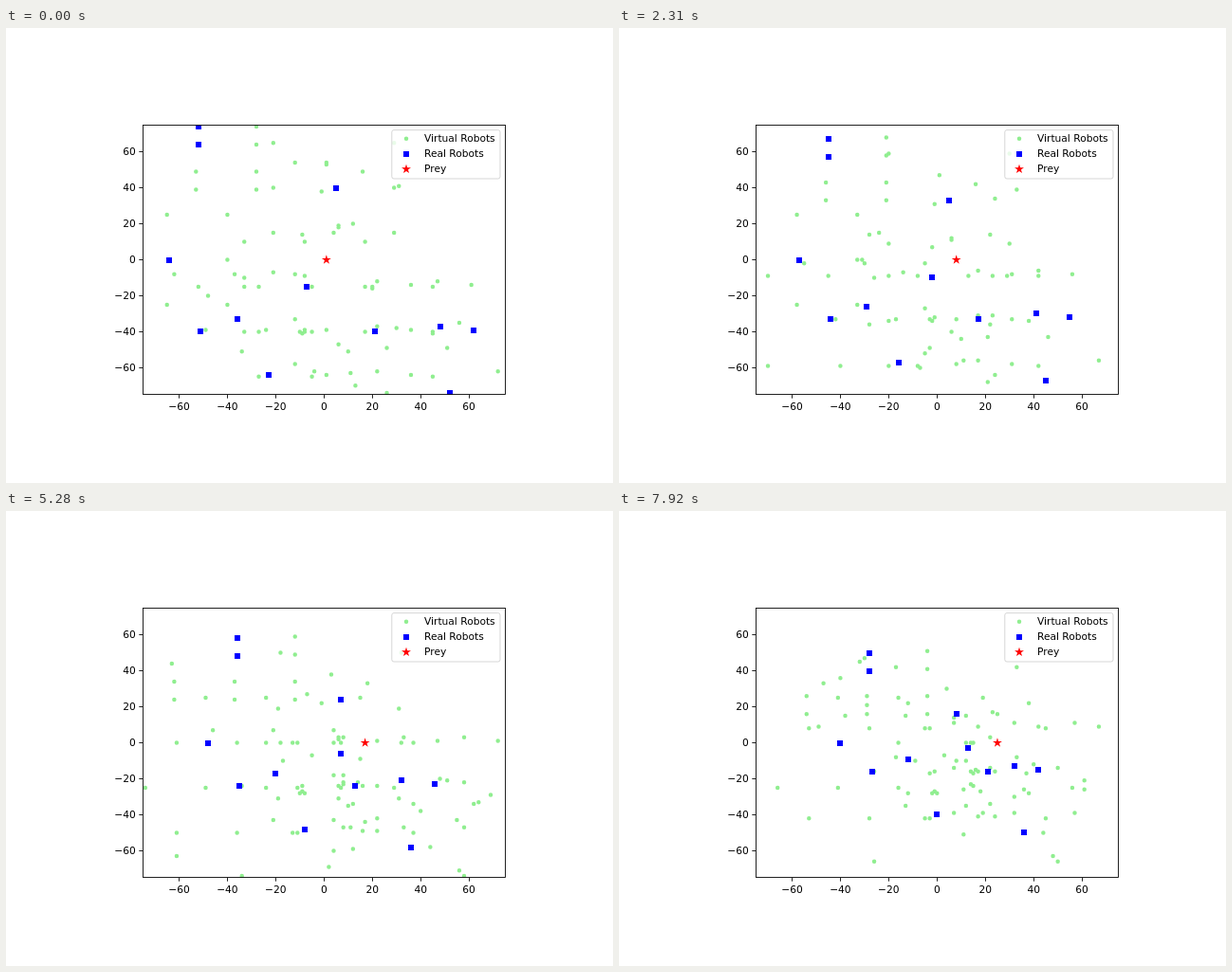
Write an HTML page that moves like this. It is 640x480 px and loops after 8 s.

```html
<!DOCTYPE html>
<html lang="en">
<head>
<meta charset="utf-8">
<title>Robots and prey</title>
<style>
html, body { margin: 0; width: 100%; height: 100%; overflow: hidden; background: #fff; }
svg { display: block; width: 100%; height: 100%; }
text { font: 10.67px "DejaVu Sans", sans-serif; }
</style>
</head>
<body>
<svg viewBox="0 0 640 480">
  <defs><clipPath id="area"><rect x="144.3" y="102.2" width="382" height="284.6"/></clipPath></defs>
  <g clip-path="url(#area)">
    <path id="virtual" fill="#90ee90"/>
    <path id="real" fill="#00f"/>
    <path id="prey" fill="#f00"/>
  </g>
  <g id="axes" fill="none" stroke="#000" stroke-width=".86">
    <rect x="144.5" y="102.5" width="382" height="284"/>
  </g>
  <g id="labels"></g>
  <g id="legend">
    <rect x="406.8" y="107.6" width="114.2" height="51.4" rx="2.2" fill="#fff" fill-opacity=".8" stroke="#ccc" stroke-opacity=".8"/>
  </g>
</svg>
<script>
const STEP = 330, LOOP = 8000, SPACING = 25, TURN = 16;
const $ = id => document.getElementById(id);
const px = x => 335.3 + 2.547 * x;
const py = y => 244.5 - 1.898 * y;

function add(parent, tag, attrs, text = '') {
  const el = document.createElementNS('http://www.w3.org/2000/svg', tag);
  for (const name in attrs) el.setAttribute(name, attrs[name]);
  el.textContent = text;
  parent.append(el);
}

// Marker outlines in stage pixels
const dot = (x, y, r = 2.25) => `M${x - r} ${y}a${r} ${r} 0 1 1 ${2 * r} 0a${r} ${r} 0 1 1 ${-2 * r} 0z`;
const square = (x, y) => `M${Math.round(x - 3)} ${Math.round(y - 3)}h6v6h-6z`;
function star(x, y, r = 5.2) {
  const tips = Array.from({ length: 10 }, (_, i) => {
    const a = i * Math.PI / 5, d = i % 2 ? r * 0.382 : r;
    return `${x + d * Math.sin(a)} ${y - d * Math.cos(a)}`;
  });
  return `M${tips.join('L')}z`;
}

const approach = (y, n) => y - Math.sign(y) * Math.min(n, Math.abs(y));

// Closes in on y = 0 one cell per step; x moves by lead until the turn, then by tail
const glide = (x, y, lead, tail = lead, turn = TURN) => k =>
  [x + lead * Math.min(k, turn) + tail * Math.max(0, k - turn), approach(y, k)];

// Passes through [step, x, y] points on the grid
const through = (...path) => k => {
  let i = 1;
  while (i < path.length - 1 && path[i][0] < k) i++;
  const [k0, x0, y0] = path[i - 1], [k1, x1, y1] = path[i];
  const u = (k - k0) / (k1 - k0);
  return [Math.round(x0 + (x1 - x0) * u), Math.round(y0 + (y1 - y0) * u)];
};

// Each robot shows virtual neighbours on some sides: always, late only, early only
const robot = (at, sides, late = '', early = '') => ({ at, sides, late, early });
const robots = [
  robot(glide(-52, 74, 1), 'E S SE', 'SW'),
  robot(glide(-52, 64, 1), 'E S SE', 'SW'),
  robot(through([0, 5, 40], [13, 5, 27], [15, 7, 25], [24, 8, 16]), 'NW NE SW SE', '', 'W E S'),
  robot(glide(-64, 0, 1), 'N NE E S SE', 'SW'),
  robot(through([0, -7, -15], [4, -5, -11], [10, 1, -10], [13, 4, -7], [21, 12, -4], [24, 13, -3]),
    'NW NE SW SE', '', 'N W E S'),
  robot(glide(-36, -33, 1), 'NW N NE E SE', 'S'),
  robot(glide(-51, -40, 1), 'NW N NE E SW SE', 'S'),
  robot(through([0, -23, -64], [24, 0, -40]), 'NW N NE E', 'SW'),
  robot(through([0, 21, -40], [4, 17, -36], [10, 17, -30], [15, 12, -25], [24, 21, -16]), 'NW NE SW SE', '', 'N W E'),
  robot(glide(48, -37, -1, 0), 'NW N W SW SE', 'NE S'),
  robot(glide(62, -39, -1, 0, 20), 'NW N W SW', 'NE'),
  robot(glide(52, -74, -1, 0), 'NW N W', 'NE')
];

function neighbours({ at, sides, late, early }, k) {
  // The neighbours trail their robot by one step
  const [x, y] = k ? at(k - 1) : [at(0)[0] - 1, at(0)[1]];
  const shown = [sides, k >= 12 ? late : '', k < 3 ? early : ''].join(' ').trim().split(/\s+/);
  return shown.map(side => [
    x + SPACING * (side.includes('E') - side.includes('W')),
    y + SPACING * (side.includes('N') - side.includes('S'))
  ]);
}

// Free virtual robots
const early = [
  glide(6, -47, 0, 1), glide(10, -51, 0, 1), glide(11, -63, 0, 1),
  glide(30, -38, -1, 1), glide(45, -41, -1, 1), glide(31, 41, -1, 1),
  glide(-1, 38, 0, 1), glide(6, 19, 0, 1), glide(6, 18, 0, 1),
  glide(-9, 14, 1), glide(20, -16, -1, 1),
  glide(-9, -41, 1), glide(-10, -40, 1), glide(-8, -39, 1),
  k => [k - 33, -10], k => [k - 21, -7],
  ...[[-4, 14], [11, 9]].map(([dx, dy]) => k => {
    const [x, y] = robots[2].at(k);
    return [x + dx, y + dy];
  })
];
const late = [
  glide(85, -45, -1), glide(80, -49, -1), glide(74, -38, -1), glide(64, -36, -1),
  glide(72, -87, -1), glide(74, -90, -1), glide(56, -54, -1),
  glide(22, -58, 0), glide(44, -74, 0), glide(8, -34, 0),
  ...[0, 1, 2].map(i => k => [k - 26 + i, -28 + i % 2])
];

function random(seed) {
  return () => {
    seed = seed + 0x6d2b79f5 | 0;
    let t = Math.imul(seed ^ seed >>> 15, 1 | seed);
    t ^= t + Math.imul(t ^ t >>> 7, 61 | t);
    return ((t ^ t >>> 14) >>> 0) / 2 ** 32;
  };
}

// Short-lived strays, heading for the prey
function strays(k) {
  const life = 3, rnd = random(1 + Math.floor(k / life));
  return Array.from({ length: 9 }, () => {
    const x = Math.round(rnd() * 125 - 65), y = Math.round(rnd() * 125 - 70);
    return [x + Math.sign(k - x) * (k % life), approach(y, k % life)];
  });
}

const virtualPoints = k => [
  ...robots.flatMap(r => neighbours(r, k)),
  ...early.map(at => at(k)),
  ...(k >= 16 ? late.map(at => at(k)) : []),
  ...strays(k)
];

const outline = (points, mark) => points.map(([x, y]) => mark(px(x), py(y))).join('');

let shown = -1;
function draw() {
  const k = Math.floor(performance.now() % LOOP / STEP);
  if (k !== shown) {
    shown = k;
    $('virtual').setAttribute('d', outline(virtualPoints(k), dot));
    $('real').setAttribute('d', outline(robots.map(r => r.at(k)), square));
    $('prey').setAttribute('d', outline([[k + 1, 0]], star));
  }
  requestAnimationFrame(draw);
}

const snap = v => Math.floor(v) + 0.5;
for (let v = -60; v <= 60; v += 20) {
  const label = String(v).replace('-', '\u2212');
  add($('axes'), 'path', { d: `M${snap(px(v))} 387v3.7M144 ${snap(py(v))}h-3.7` });
  add($('labels'), 'text', { x: px(v), y: 403, 'text-anchor': 'middle' }, label);
  add($('labels'), 'text', { x: 136.8, y: Math.round(py(v) + 3.8), 'text-anchor': 'end' }, label);
}

[['Virtual Robots', dot, '#90ee90'], ['Real Robots', square, '#00f'], ['Prey', star, '#f00']].forEach(([name, mark, fill], i) => {
  add($('legend'), 'path', { d: mark(422, 116.7 + 16.1 * i), fill });
  add($('legend'), 'text', { x: 441, y: 120 + 16 * i }, name);
});

draw();
</script>
</body>
</html>
```
